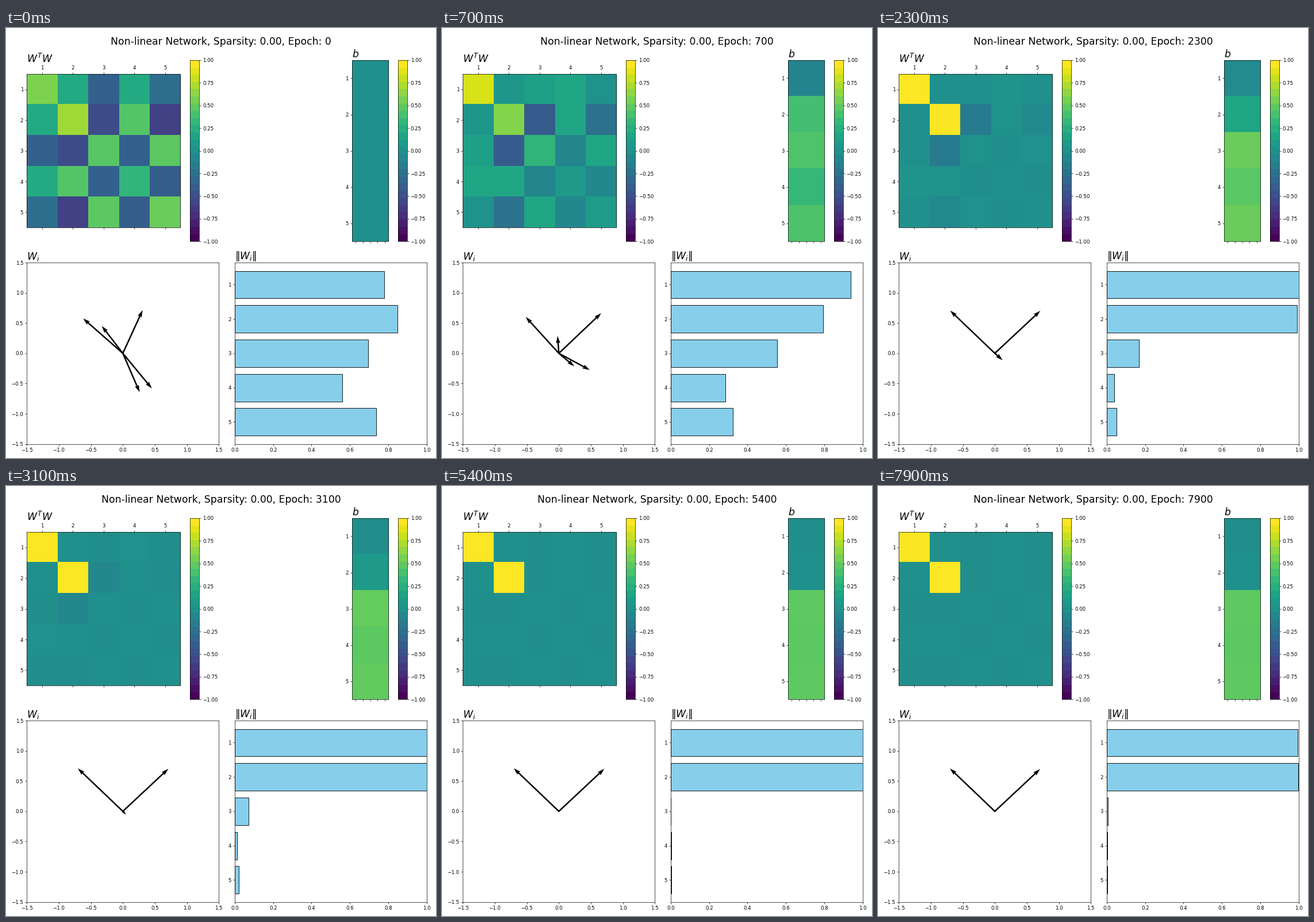
Recreate the animation shown at these times as a matplotlib script. Size 748 px wide and 748 px high, loop 8 s.

```python
import numpy as np
import matplotlib.pyplot as plt
from matplotlib.animation import FuncAnimation
from matplotlib.cm import ScalarMappable
from matplotlib.colors import Normalize

SIZE, INCHES = 748, 12
FRAMES, STEP = 80, 100
N = 5
LABELS = [str(i + 1) for i in range(N)]

t = np.arange(FRAMES)  # time in units of 100 epochs


def fade(start, tau, power=1, push=0):
    """Offset that begins at start, drifts by push per step and dies out."""
    return (start + push * t) * np.exp(-(t / tau) ** power)


# The two strong features grow to unit length, the other three vanish.
norm = np.array([
    1 - fade(.222, 6.3, 2.2),
    1 - fade(.153, 11, 2, push=.0225),
    fade(.695, 18.3, 1.55),
    fade(.560, 9.9, 1.15),
    fade(.738, 8.5),
])
angle = np.radians([
    44.7 + fade(21.9, 3.5, 2),
    134.7 + fade(2.4, 9, 2, push=-1.39),
    -50 + fade(-17.8, 6.4, push=11.2),
    70 + fade(56, 8.2),
    -46 + fade(-6.1, 6.4, push=2.7),
])
# Biases of kept features return to 0, the others settle at the input mean.
bias = np.array([
    fade(0, 7, push=-.039),
    fade(0, 10.2, 1.2, push=.108),
    .5 + fade(-.5, 8, push=.054),
    .5 + fade(-.5, 6.5),
    .5 + fade(-.5, 8, push=.052),
])

# Sampling noise keeps the settled weights slightly restless.
rng = np.random.default_rng(4)
norm = np.abs(norm + rng.normal(0, .003, norm.shape) * np.clip(t / 40, 0, 1))
W = norm * np.array([np.cos(angle), np.sin(angle)])  # (2, N, FRAMES)


def gram(i):
    return W[:, :, i].T @ W[:, :, i]


def headline(i):
    return f"Non-linear Network, Sparsity: 0.00, Epoch: {100 * i}"


def add_colorbar(ax):
    bands = plt.get_cmap("viridis").resampled(25)
    fig.colorbar(ScalarMappable(Normalize(-1, 1), bands), ax=ax)


fig, ((ax_gram, ax_bias), (ax_vec, ax_norm)) = plt.subplots(
    2, 2, figsize=(INCHES, INCHES), dpi=SIZE / INCHES)
title = fig.suptitle(headline(0), fontsize=20)

heat = dict(cmap="viridis", vmin=-1, vmax=1)
gram_im = ax_gram.matshow(gram(0), **heat)
ax_gram.set_xticks(range(N), LABELS)
ax_gram.set_yticks(range(N), LABELS)
add_colorbar(ax_gram)

bias_im = ax_bias.imshow(bias[:, :1], **heat)
ax_bias.set_xticks(np.linspace(-.4, .4, N), [""] * N)
ax_bias.set_yticks(range(N), LABELS)
add_colorbar(ax_bias)

zeros = np.zeros(N)
arrows = ax_vec.quiver(zeros, zeros, W[0, :, 0], W[1, :, 0],
                       angles="xy", scale_units="xy", scale=1)
ax_vec.set(xlim=(-1.5, 1.5), ylim=(-1.5, 1.5))

bars = ax_norm.barh(range(1, N + 1), norm[:, 0], color="skyblue", edgecolor="black")
ax_norm.set_xlim(0, 1)
ax_norm.invert_yaxis()

for ax, text in ((ax_gram, r"$W^TW$"), (ax_bias, r"$b$"),
                 (ax_vec, r"$W_i$"), (ax_norm, r"$\|W_i\|$")):
    ax.set_title(text, loc="left", fontsize=20)
fig.tight_layout()


def draw(i):
    title.set_text(headline(i))
    gram_im.set_data(gram(i))
    bias_im.set_data(bias[:, i:i + 1])
    arrows.set_UVC(W[0, :, i], W[1, :, i])
    for bar, width in zip(bars, norm[:, i]):
        bar.set_width(width)
    return []


anim = FuncAnimation(fig, draw, frames=FRAMES, interval=STEP,
                     repeat=True, repeat_delay=0)
plt.show()
```
